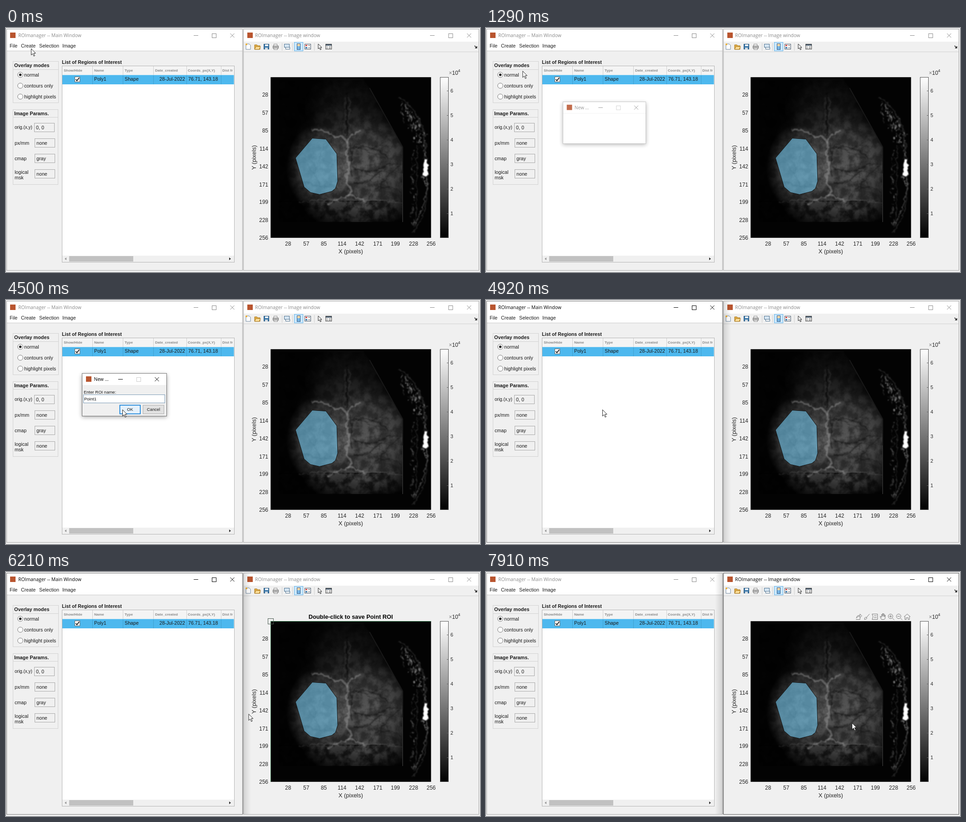
Animation, 1043 px wide and 537 px high, one loop 8000 ms. Source, as an HTML page:

```html
<!DOCTYPE html>
<html lang="en">
<head>
<meta charset="utf-8">
<title>ROI manager</title>
<style>
html, body { margin: 0; width: 100%; height: 100%; overflow: hidden; background: #f3f3f3; }
svg { display: block; }
text { font-family: "Liberation Sans", Arial, sans-serif; white-space: pre; }
.win { font-family: "Open Sans", sans-serif; }
.b { font-weight: bold; }
.mid { text-anchor: middle; }
.end { text-anchor: end; }
.line { fill: none; stroke: currentColor; }
</style>
</head>
<body>
<svg id="stage" width="1043" height="537" viewBox="0 0 1043 537"></svg>
<script>
const LOOP = 8000;
const stage = document.getElementById('stage');

// ---- markup helpers ----
const text = (x, y, s, size = 10.7, cls = '', fill = '#1a1a1a') =>
  `<text x="${x}" y="${y}" font-size="${size}" class="${cls}" fill="${fill}">${s}</text>`;
const rect = (x, y, w, h, fill, stroke, extra = '') => stroke
  ? `<rect x="${x + .5}" y="${y + .5}" width="${w - 1}" height="${h - 1}" fill="${fill}" stroke="${stroke}" ${extra}/>`
  : `<rect x="${x}" y="${y}" width="${w}" height="${h}" fill="${fill}" ${extra}/>`;
const line = (d, color, w = 1, extra = '') =>
  `<path d="${d}" fill="none" stroke="${color}" stroke-width="${w}" ${extra}/>`;
const group = (id, body) => `<g id="${id}">${body}</g>`;
const logo = (x, y) => rect(x, y, 12, 12, '#b9552f');
const windowButtons = (x, y, gap, maxColor = 'currentColor') =>
  line(`M${x - 5} ${y}.5h10M${x + 2 * gap - 4.5} ${y - 4}l9 9m0-9l-9 9`, 'currentColor') +
  rect(x + gap - 5, y - 4, 10, 10, 'none', maxColor);
const button = (x, y, w, h, label, id = '') =>
  rect(x, y, w, h, '#e1e1e1', '#adadad', id && `id="${id}"`) +
  text(x + w / 2, y + h / 2 + 3.4, label, 9.3, 'mid');

let seed = 7;
const rnd = () => (seed = (seed * 16807) % 2147483647) / 2147483647;

// ---- main window ----
function mainWindow() {
  const cols = [[127, 'Show/Hide'], [194, 'Name'], [261, 'Type'], [328, 'Date_created'], [400, 'Coords_px(X,Y)'], [476, 'Dist fr']];
  const params = [[62, 209, '0, 0'], [63, 243, 'none'], [63, 277, 'gray'], [63, 311, 'none']];
  const modes = ['normal', 'contours only', 'highlight pixels'];
  const menus = [[8, 'File'], [33, 'Create'], [73, 'Selection'], [124, 'Image']];
  return rect(1, 2, 520, 532, '#f0f0f0', '#a5a5a5') + rect(2, 3, 518, 47, '#fff') +
    line('M2 50.5H520', '#c9c9c9') + logo(9, 10) +
    group('mainTitle', text(27, 20.3, 'ROImanager -- Main Window', 10.4, 'win', 'currentColor') + windowButtons(418, 16, 40)) +
    menus.map(([x, s]) => text(x, 42.6, s)).join('') +
    rect(15, 73, 101, 92, 'none', '#d2d2d2') + line('M15 91.5h100', '#d2d2d2') + text(18, 86, 'Overlay modes', 10.8, 'b') +
    modes.map((s, i) => `<circle cx="31.5" cy="${103 + 24 * i}" r="5.8" fill="#fff" stroke="#777"/>` + text(40, 107 + 24 * i, s)).join('') +
    '<circle cx="31.5" cy="103" r="2.8" fill="#222"/>' +
    rect(15, 179, 100, 166, 'none', '#d2d2d2') + line('M15 196.5h99', '#d2d2d2') + text(18, 192, 'Image Params.', 10.8, 'b') +
    text(19, 222, 'orig.(x,y)', 10) + text(19, 257, 'px/mm') + text(19, 291, 'cmap') + text(19, 321, 'logical') + text(19, 333, 'msk') +
    params.map(([x, y, s]) => rect(x, y, 45, 20, '#f0f0f0', '#a9a9a9') + text(x + 4, y + 14.2, s)).join('') +
    text(123, 78.6, 'List of Regions of Interest', 10.7, 'b') +
    rect(123, 83, 380, 433, '#fff', '#b4b4b4') + rect(124, 84, 378, 19, '#f4f4f4') +
    rect(124, 103.5, 377.5, 20.5, '#4db8ee') +
    [190, 257, 324, 397, 473].map(x => line(`M${x}.5 84v19`, '#cfcfcf') + line(`M${x}.5 104v20`, '#3f9fd0')).join('') +
    cols.map(([x, s]) => text(x, 96, s, 8, 'b', '#8a8a8a')).join('') +
    rect(151, 107, 12, 12, '#fff', '#666') + line('M153.5 113l2.5 3l5-6.5', '#111', 1.8) +
    text(194, 116.3, 'Poly1') + text(261, 116.3, 'Shape') + text(394, 116.3, '28-Jul-2022', 10.7, 'end') + text(401, 116.3, '76.71, 143.18') +
    rect(124, 501, 378, 14, '#f0f0f0') + rect(139, 502, 141, 12, '#c1c1c1') +
    '<path d="M133 505v6l-4-3z" fill="#999"/><path d="M491 505v6l4-3z" fill="#333"/>';
}

// ---- microscope picture: soft tones and a few branching vessels ----
function branch(x, y, angle, len, width, color) {
  if (len < 8) return '';
  const bend = angle + (rnd() - .5) * .9;
  const mx = x + Math.cos(bend) * len / 2, my = y + Math.sin(bend) * len / 2;
  const ex = x + Math.cos(angle) * len, ey = y + Math.sin(angle) * len;
  return line(`M${x.toFixed(1)} ${y.toFixed(1)}Q${mx.toFixed(1)} ${my.toFixed(1)} ${ex.toFixed(1)} ${ey.toFixed(1)}`, color, width) +
    branch(ex, ey, angle - .15 - rnd() * .4, len * .73, width * .75, color) +
    branch(ex, ey, angle + .2 + rnd() * .5, len * .66, width * .65, color);
}
function specks(count, place, size, bright) {
  let out = '';
  for (let i = 0; i < count; i++) {
    const [x, y] = place(rnd());
    out += line(`M${x.toFixed(1)} ${y.toFixed(1)}l${(rnd() * 3 - 1).toFixed(1)} ${(1 + rnd() * size).toFixed(1)}`, '#eee', 1.4, `opacity="${(rnd() * bright).toFixed(2)}"`);
  }
  return out;
}
function picture() {
  const glow = (x, y, rx, ry, o) => `<ellipse cx="${x}" cy="${y}" rx="${rx}" ry="${ry}" fill="url(#glow)" opacity="${o}"/>`;
  const grain = (y, h, o) => rect(600, y, 275, h, '#000', '', `filter="url(#grain)" opacity="${o}"`);
  const dark = 'rgba(15,15,15,.38)', pale = 'rgba(170,170,170,.42)';
  return '<g clip-path="url(#axes)">' + rect(582, 108, 354, 354, '#030303') +
    '<g clip-path="url(#tissue)">' +
    glow(762, 305, 142, 150, .24) + glow(808, 305, 112, 110, .34) + glow(692, 308, 76, 98, .36) +
    glow(750, 180, 95, 85, .1) + glow(785, 398, 130, 42, .18) +
    grain(115, 268, .4) + grain(380, 48, .65) +
    '<g filter="url(#soft)">' +
    line('M748 140V235', 'rgba(10,10,10,.5)', 3) + line('M743 150V235M754 150V235', 'rgba(140,140,140,.14)', 2) +
    line('M672 222q32 0 42 10t20 2q10 8 13 14q6-14 14-16t18-9', pale, 3.5) +
    line('M747 246q6 18 0 34q8 18 3 36q-7 16 3 30q8 8 1 16l-6 6', pale, 5) +
    line('M754 250q7 20 2 42t3 34', dark, 3) +
    line('M704 386q12-5 18-10q8 3 14-6q8 4 14-5q12-2 16 6q14 0 22 9', pale, 3) +
    line('M640 382q110-14 232 0', 'rgba(150,150,150,.22)', 2) +
    line('M760 306q20 6 38 6t30-9t42-6M764 262q25-8 48 3t30 22M762 338q28 2 40-8t20-16', dark, 3.2) +
    branch(758, 262, .15, 34, 2, dark) + branch(870, 295, 2.5, 34, 2, dark) + branch(868, 360, 3.6, 32, 2, dark) + branch(790, 380, -.9, 30, 1.6, dark) +
    line('M650 336q20 4 32 8t26 2t18 8', dark, 3.6) +
    branch(690, 345, -2, 30, 2, dark) + branch(722, 300, 3.6, 26, 1.5, dark) + branch(700, 252, 2, 24, 1.5, dark) +
    '</g></g>' +
    line('M800 132L873 262V427', '#181818', 2) +
    line('M872.5 320V427', '#555', 1, 'opacity=".5"') +
    '<g filter="url(#soft)">' +
    line('M862 150q50 30 58 90t4 120t-34 90M880 160q46 50 40 140M902 262q2 100-4 170', 'rgba(130,130,130,.32)', 1.5) +
    specks(130, v => [862 + v * 48 + rnd() * 18, 148 + v * 85 + rnd() * 45], 6, .65) +
    specks(60, () => [889 + rnd() * 9, 265 + rnd() * 165], 6, .45) +
    specks(25, () => [913 + rnd() * 14, 262 + rnd() * 85], 9, .7) +
    line('M926 325q-2 60-30 110', 'rgba(170,170,170,.45)', 1.5) +
    '<ellipse cx="921" cy="307" rx="6" ry="17" fill="#fff"/></g></g>' +
    '<path d="M674 242.5L704 244.5L728 277L730 337L725 353L717 359.5L690 366.5L670 362L656 350L637 286Z" fill="#70c4ea" fill-opacity=".6" stroke="#111"/>';
}

// ---- image window ----
function toolbar() {
  const ico = (x, body) => `<g transform="translate(${x} 41)">${body}</g>`;
  return ico(533, '<path d="M-5-6h7l3 3v9H-5z" fill="#fff" stroke="#7088a0"/><circle cx="-4" cy="-5" r="2" fill="#f0b030"/>') +
    ico(553, '<path d="M-6-4h5l2 2h5v8H-6z" fill="#e0ac45" stroke="#a87820"/><path d="M-6 6l3-6h10l-3 6z" fill="#ffe09a" stroke="#a87820"/>') +
    ico(573, rect(-6, -6, 12, 12, '#3b77a8', '#27577f') + rect(-3, -5, 7, 4, '#e8f0f8') + rect(-3, 2, 6, 4, '#cfd8e0')) +
    ico(593, rect(-4, -6, 8, 6, '#fff', '#888') + rect(-6, -2, 13, 6, '#b8b8b8', '#777') + rect(-4, 3, 9, 4, '#fff', '#888')) +
    ico(618, rect(-6, -6, 12, 8, '#d6e6f3', '#4f7391') + rect(-3, 1, 10, 5, '#fff', '#4f7391')) +
    rect(634, 31, 20, 20, '#cce8ff', '#66b5e8') +
    ico(644, rect(-4, -7, 8, 14, '#fbd9a8', '#345a80') + rect(-3, -1, 6, 7, '#78b6e6')) +
    ico(664, rect(-7, -6, 14, 12, '#fff', '#456') + rect(-5, -4, 4, 3, '#d9534f') + rect(-5, 1, 4, 3, '#3b77a8') + line('M1-2.5h4M1 2.5h4', '#555')) +
    ico(687, '<path d="M0-6v11l2.5-2.5l2 4.5l2-1l-2-4h3.5z" fill="#fff" stroke="#222"/>') +
    ico(710, rect(-7, -6, 14, 12, '#fff', '#444') + rect(-6, -5, 12, 3, '#567') + line('M-5 .5h3m2 0h5M-5 3.5h3m2 0h5', '#444')) +
    [607, 630, 678].map(x => line(`M${x}.5 33v17`, '#cfcfcf')).join('') +
    line('M1031 39l5 5m0-4v4h-4', '#222', 1.5);
}
function imageWindow() {
  const ticks = [28, 57, 85, 114, 142, 171, 199, 228, 256];
  return rect(522, 2, 519, 532, '#f0f0f0', '#a5a5a5') + rect(523, 3, 517, 27, '#fff') +
    line('M523 52.5h517', '#d0d0d0') + logo(531, 10) +
    group('imageTitle', text(548, 20.3, 'ROImanager -- Image window', 10.4, 'win', 'currentColor') + windowButtons(938, 16, 40.5)) +
    toolbar() + picture() +
    ticks.map(v => text(577, 112.5 + v / 256 * 353.5, v, 12, 'end', '#262626') +
      text(582 + v / 256 * 353.5, 479, v, 12, 'mid', '#262626')).join('') +
    text(758.5, 496, 'X (pixels)', 13, 'mid', '#262626') +
    `<g transform="translate(550 285) rotate(-90)">${text(0, 0, 'Y (pixels)', 13, 'mid', '#262626')}</g>` +
    rect(955, 108, 19, 354, 'url(#bar)', '#555') +
    [1, 2, 3, 4, 5, 6].map(n => text(978, 466 - n * 54, n, 10.8, '', '#262626') + line(`M970 ${462 - n * 54}.5h4`, '#666')).join('') +
    text(974.5, 103, '×', 12, '', '#777') + text(981.5, 102.5, '10', 12, '', '#262626') + text(994.5, 97, '4', 9, '', '#262626');
}

// ---- transient parts ----
const shadow = (x, y, w, h) => rect(x, y + 3, w, h, '#000', '', 'filter="url(#blur)" opacity=".33"');
function nameDialog() {
  return shadow(167, 161, 187, 94) + rect(167, 161, 187, 95, '#f0f0f0', 'currentColor', 'stroke-opacity=".5"') +
    rect(168, 162, 185, 25, '#fff') + logo(176, 168) +
    text(193.5, 178, 'New ...', 10.3, 'win', 'currentColor') + windowButtons(252, 174, 40, '#ccc') +
    group('nameForm', text(171, 206, 'Enter ROI name:', 9.5) + rect(170, 208, 180, 19, '#fff', '#7a9ab5') +
      '<text id="typed" x="172" y="220.5" font-size="9.5" fill="#111"></text><path id="caret" d="M.5 211.5v12" stroke="#000"/>' +
      button(250, 231, 46, 20, 'OK', 'ok') + rect(250, 231, 46, 20, 'none', '#0078d7', 'stroke-width="1.6"') +
      button(301, 231, 47, 20, 'Cancel')) +
    group('nameBlank', rect(168, 188, 185, 67, '#fff'));
}
function methodDialog() {
  return shadow(104, 158, 313, 104) + rect(104, 158, 313, 104, '#f0f0f0', '#777') + rect(105, 159, 311, 25, '#fff') + logo(112, 165) +
    text(130, 175, 'Pixel selection method', 10.3, 'win', '#000') + windowButtons(314, 171, 40.5, '#ccc') +
    '<circle cx="126" cy="210" r="14.5" fill="#2ba0ea"/>' + text(126, 218, '?', 22, 'mid b', '#fff') +
    text(150, 216, 'Choose how to select Pixel', 9.4) +
    button(130, 233, 80, 20, 'Interactively') + rect(130, 233, 80, 20, 'none', '#0078d7', 'stroke-width="1.8"') +
    rect(133, 236, 74, 14, 'none', '#777', 'stroke-dasharray="1 1" stroke-width=".6"') +
    button(219, 233, 80, 20, 'Type coordinates', 'coords') + button(309, 233, 80, 20, 'Cancel');
}
function axesTools() {
  const paths = ['M-6 6h9v-4M-5 3q1-7 8-6v-3l4 4l-4 4v-3q-5-1-8 4', 'M6-6L-1 2M-5 6q0-5 3-5q4 1 1 4z', 'M-6-6H6V6H-6L-4 0zM-2-2h6M-2 2h6',
    'M-3 6Q-6 2-6-1l3 2v-6h2v4v-6h2v6v-5h2v6l2-4v5q0 4-2 5z', 'M3 3l4 4M-4-1h6m-3-3v6', 'M3 3l4 4M-4-1h6', 'M-7 0L0-6l7 6M-5-1v7h3v-4h4v4h3v-7'];
  return paths.map((d, i) => `<g transform="translate(${820 + i * 17.8} 98.5)" class="line" color="#777"><path d="${d}"/>` +
    (i === 4 || i === 5 ? '<circle cx="-1" cy="-1" r="5"/>' : '') + '</g>').join('');
}

stage.innerHTML = `<defs>
  <radialGradient id="glow"><stop offset="0" stop-color="#b4b4b4"/><stop offset=".55" stop-color="#b4b4b4" stop-opacity=".7"/><stop offset="1" stop-color="#b4b4b4" stop-opacity="0"/></radialGradient>
  <linearGradient id="bar" x2="0" y2="1"><stop stop-color="#fff"/><stop offset="1" stop-color="#000"/></linearGradient>
  <linearGradient id="edge"><stop stop-color="#000" stop-opacity=".14"/><stop offset="1" stop-color="#000" stop-opacity="0"/></linearGradient>
  <clipPath id="axes"><rect x="582.3" y="108.3" width="353" height="353.4"/></clipPath>
  <clipPath id="tissue"><path d="M582 108H784L800 132L873 262V427H582Z"/></clipPath>
  <filter id="soft"><feTurbulence baseFrequency=".06" numOctaves="2" seed="2" result="noise"/>
    <feDisplacementMap in="SourceGraphic" in2="noise" scale="9" xChannelSelector="R" yChannelSelector="G"/><feGaussianBlur stdDeviation=".8"/></filter>
  <filter id="blur" x="-20%" y="-30%" width="140%" height="160%"><feGaussianBlur stdDeviation="5"/></filter>
  <filter id="grain" x="0" y="0" width="1" height="1"><feTurbulence type="fractalNoise" baseFrequency=".05" numOctaves="4" seed="4"/><feColorMatrix values="0 0 0 0 0  0 0 0 0 0  0 0 0 0 0  3 0 0 0 -1"/></filter>
</defs>` + mainWindow() + imageWindow() +
  group('mainEdge', rect(521, 3, 18, 530, 'url(#edge)') + rect(1, 2, 520, 532, 'none', '#777')) +
  group('imageEdge', rect(-522, 3, 18, 530, 'url(#edge)', '', 'transform="scale(-1 1)"') + rect(522, 2, 519, 532, 'none', '#555')) +
  group('axesTitle', text(758.5, 103, 'Double-click to save Point ROI', 12.8, 'mid b', '#000')) +
  group('axesTools', axesTools()) +
  group('crosshair', '<path id="hairs" clip-path="url(#axes)" stroke="#3f9a5f" fill="none"/><rect id="handle" width="12" height="12" fill="none" stroke="#4a5a50"/>') +
  group('nameDialog', nameDialog()) + group('methodDialog', methodDialog()) +
  group('pointer', '<path d="M.5.5V14.5L3.8 11.4L6.2 17L8.4 16L6 10.5H10.2Z" fill="#fff" stroke="#111" stroke-width=".9"/>');

// ---- motion ----
const el = Object.fromEntries([...stage.querySelectorAll('[id]')].map(e => [e.id, e]));
const show = (e, on) => e.setAttribute('visibility', on ? 'inherit' : 'hidden');
const within = (t, a, b) => t >= a && t < b;
const path = [[0, 55, 45], [200, 55, 45], [820, 80, 94], [1290, 80, 94], [1640, 196, 204], [2340, 237, 230], [3680, 237, 230],
  [4380, 256, 241], [5050, 256, 241], [5380, 197, 240], [5640, 197, 240], [6070, 376, 278], [6210, 533, 312], [6360, 630, 324], [6980, 805, 332], [LOOP, 805, 332]];
const keyTimes = [2830, 2980, 3120, 3260, 3400, 3560];

function pointerAt(t) {
  const i = path.findIndex(p => p[0] > t);
  const [t0, x0, y0] = path[i - 1], [t1, x1, y1] = path[i];
  const k = (t - t0) / (t1 - t0);
  return [x0 + (x1 - x0) * k, y0 + (y1 - y0) * k];
}

function render(t) {
  const [x, y] = pointerAt(t);
  const mainActive = within(t, 140, 1150) || within(t, 4700, 5000) || within(t, 5640, 7710);
  const imageActive = t >= 7710;
  el.mainTitle.setAttribute('color', mainActive ? '#000' : '#8a8a8a');
  el.imageTitle.setAttribute('color', imageActive ? '#000' : '#8a8a8a');
  show(el.mainEdge, mainActive);
  show(el.imageEdge, imageActive);

  const opening = t < 1400;
  show(el.nameDialog, within(t, 1180, 4660));
  show(el.nameBlank, opening);
  show(el.nameForm, !opening);
  el.nameDialog.setAttribute('color', opening ? '#888' : '#000');
  el.nameDialog.setAttribute('opacity', Math.min(1, Math.max(0, (t - 1180) / 130)));
  el.nameDialog.setAttribute('transform', opening ? 'translate(260.5 208) scale(.98) translate(-260.5 -208)' : '');
  el.typed.textContent = 'Point1'.slice(0, keyTimes.filter(k => k <= t).length);
  el.caret.setAttribute('transform', `translate(${Math.round(172 + el.typed.getComputedTextLength())} 0)`);
  show(el.caret, within(t, 2480, 4100));
  el.ok.setAttribute('fill', x > 249 ? '#e5f1fb' : '#e1e1e1');

  show(el.methodDialog, within(t, 5040, 5640));
  const passing = within(t, 5080, 5460);
  el.coords.setAttribute('fill', passing ? '#e2eef8' : '#e1e1e1');
  el.coords.setAttribute('stroke', passing ? '#6aabdc' : '#adadad');

  const placing = within(t, 5900, 7850), inAxes = x > 582;
  show(el.axesTitle, placing);
  show(el.crosshair, placing);
  show(el.axesTools, t >= 7850);
  const hx = inAxes ? Math.round(x) : 582, hy = inAxes ? Math.round(y) : 108;
  el.hairs.setAttribute('d', `M582 ${hy}.5H936M${hx}.5 108V462`);
  el.handle.setAttribute('x', hx - 5.5);
  el.handle.setAttribute('y', hy - 5.5);
  show(el.pointer, !(placing && inAxes));
  el.pointer.setAttribute('transform', `translate(${x.toFixed(1)} ${y.toFixed(1)})`);
}
function tick() {
  render(performance.now() % LOOP);
  requestAnimationFrame(tick);
}
tick();
</script>
</body>
</html>
```
